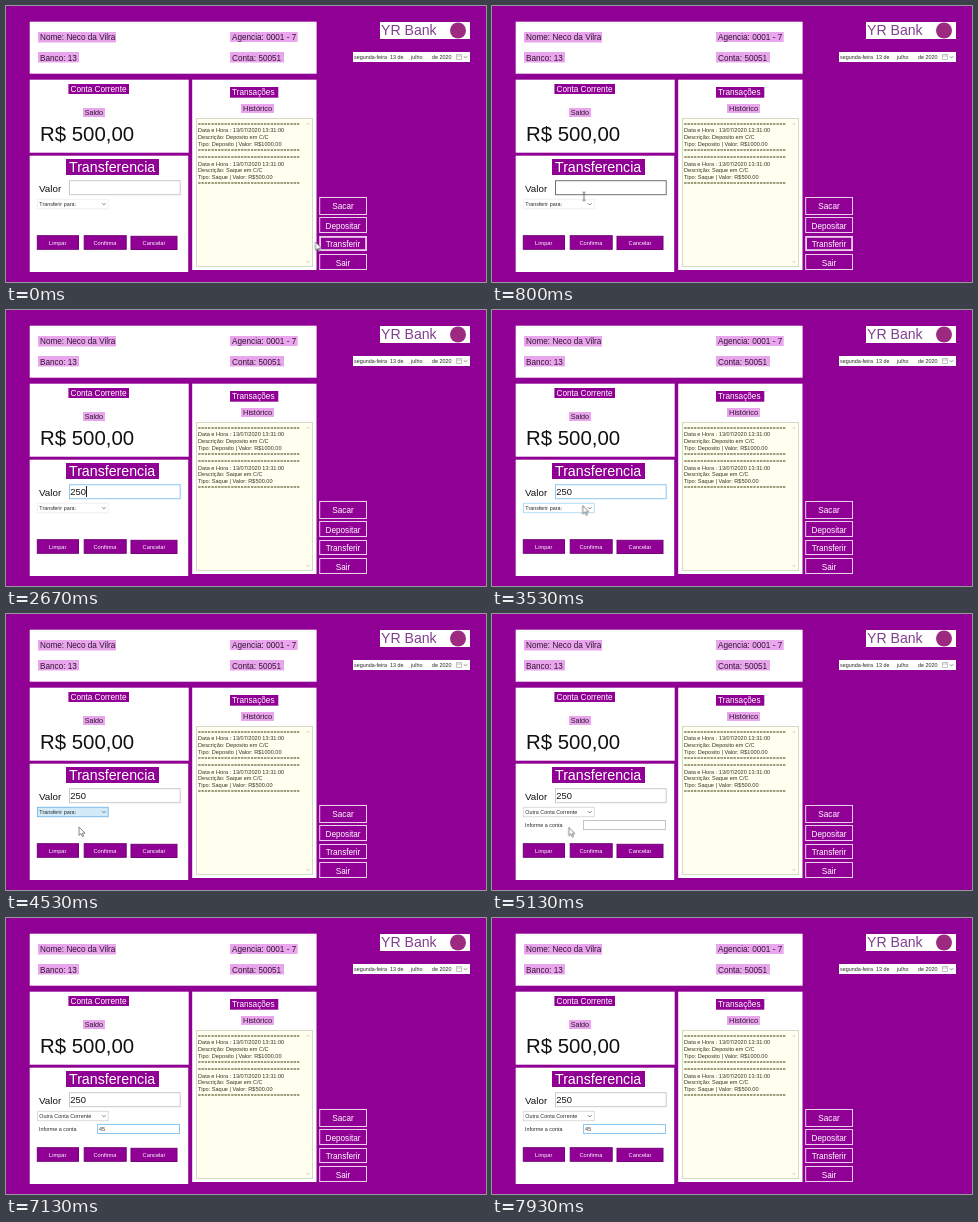
An HTML page for the animation above (8 s loop, 480 by 276 pixels).

```html
<!DOCTYPE html>
<html lang="pt">
<head>
<meta charset="utf-8">
<title>Transferencia</title>
<style>
html, body { margin: 0; width: 100%; height: 100%; overflow: hidden; background: #900094; }
svg { display: block; width: 480px; height: 276px; font-family: "Liberation Sans", Arial, sans-serif; }
.panel { fill: #fff; }
.plum { fill: #eaa6ec; }
.bg { fill: #900094; }
.label { font-size: 8.2px; fill: #301532; }
.light { fill: #fff; }
.small { font-size: 5.4px; fill: #2a2a2a; }
.history { font-size: 5.6px; fill: #33331f; }
.rule { font-size: 4.8px; letter-spacing: .49px; fill: #5c5c30; font-weight: bold; }
.side rect { fill: none; stroke: #edcfee; }
.side text { font-size: 8.2px; fill: #fff; text-anchor: middle; }
.btn rect { fill: #900094; stroke: #74007a; }
.btn text { font-size: 5.7px; fill: #fff; text-anchor: middle; }
.field { fill: #fff; stroke: #c4c4c4; }
.value { font-size: 9.4px; fill: #111; }
.chevron { fill: none; stroke: #666; stroke-width: .8; }

/* 1% = 80 ms */
.anim { animation: 8s step-end infinite; }
.focus { animation-name: focus; }
.amount { animation-name: amount; }
.caret1 { animation-name: caret1; }
.caret2 { animation-name: caret2; }
.d1 { animation-name: d1; }
.d2 { animation-name: d2; }
.d3 { animation-name: d3; }
.a1 { animation-name: a1; }
.a2 { animation-name: a2; }
.combo { animation-name: combo; }
.before { animation-name: before; }
.after { animation-name: after; }
.account { animation-name: account; }
.arrow { animation-name: arrow; }
.beam { animation-name: beam; }
.pointer { animation: move 8s ease-in-out infinite; }

@keyframes focus { 0% { opacity: 1 } 14%, 100% { opacity: 0 } }
@keyframes amount {
  0% { stroke: #cacaca } 8.4% { stroke: #707070 } 14% { stroke: #8cc8ef } 46.3%, 100% { stroke: #cacaca }
}
@keyframes caret1 {
  0% { opacity: 0; transform: none }
  14% { opacity: 1; transform: none }
  22.5% { opacity: 0; transform: none }
  29.1% { opacity: 1; transform: none }
  30% { opacity: 1; transform: translateX(6px) }
  31.6% { opacity: 1; transform: translateX(11px) }
  33.3% { opacity: 1; transform: translateX(16px) }
  34.1%, 100% { opacity: 0; transform: translateX(16px) }
}
@keyframes caret2 {
  0% { opacity: 0; transform: none }
  70.8% { opacity: 1; transform: none }
  76.6% { opacity: 1; transform: translateX(3px) }
  80% { opacity: 1; transform: translateX(6px) }
  85%, 100% { opacity: 0; transform: translateX(6px) }
}
@keyframes d1 { 0% { opacity: 0 } 30%, 100% { opacity: 1 } }
@keyframes d2 { 0% { opacity: 0 } 31.6%, 100% { opacity: 1 } }
@keyframes d3 { 0% { opacity: 0 } 33.3%, 100% { opacity: 1 } }
@keyframes a1 { 0% { opacity: 0 } 76.6%, 100% { opacity: 1 } }
@keyframes a2 { 0% { opacity: 0 } 80%, 100% { opacity: 1 } }
@keyframes combo {
  0% { stroke: #f0f0f0; fill: #fff }
  43% { stroke: #b5dcf5; fill: #fff }
  46.3% { stroke: #7fbbe6; fill: #d3eaf9 }
  61.6%, 100% { stroke: #dadada; fill: #fff }
}
@keyframes before { 0% { opacity: 1 } 61.6%, 100% { opacity: 0 } }
@keyframes after { 0% { opacity: 0 } 61.6%, 100% { opacity: 1 } }
@keyframes account { 0% { stroke: #c4c4c4 } 70.8%, 100% { stroke: #8cc8ef } }
@keyframes arrow {
  0% { opacity: 1 } 8.4% { opacity: 0 } 43% { opacity: 1 } 67%, 100% { opacity: 0 }
}
@keyframes beam {
  0% { opacity: 0 } 8.4% { opacity: 1 } 30% { opacity: 0 } 40.8% { opacity: 1 }
  43% { opacity: 0 } 67% { opacity: 1 } 76.6%, 100% { opacity: 0 }
}
@keyframes move {
  0%, .9% { transform: translate(309.5px, 236px) }
  9%, 40.8% { transform: translate(92px, 190.5px) }
  44%, 47% { transform: translate(90.7px, 195.5px) }
  56%, 62.5% { transform: translate(73px, 213px) }
  70.8%, 100% { transform: translate(120.5px, 218px) }
}
</style>
</head>
<body>
<svg viewBox="0 0 480 276">
  <rect class="bg" width="480" height="276"/>

  <g class="panel">
    <rect x="23.7" y="15.7" width="286.9" height="52"/>
    <rect x="23.7" y="73.7" width="159" height="73"/>
    <rect x="23.7" y="149.7" width="158.5" height="116.3"/>
    <rect x="186.2" y="73.7" width="124.3" height="190.3"/>
    <rect x="374" y="16" width="90" height="17"/>
    <rect x="347" y="46" width="117" height="10"/>
  </g>

  <g class="plum">
    <rect x="32" y="26" width="78" height="10.5"/>
    <rect x="32" y="46" width="41" height="10.5"/>
    <rect x="224" y="26" width="67.7" height="10"/>
    <rect x="224" y="46" width="54" height="10.5"/>
    <rect x="77" y="102" width="22" height="9"/>
    <rect x="235" y="98" width="33" height="9"/>
  </g>
  <g class="label">
    <text x="34" y="34">Nome: Neco da Vilra</text>
    <text x="34" y="54.5">Banco: 13</text>
    <text x="226" y="34">Agencia: 0001 - 7</text>
    <text x="226" y="54.5">Conta: 50051</text>
    <text x="78.7" y="109" font-size="7.2">Saldo</text>
    <text x="237" y="105" font-size="7.5">Histórico</text>
  </g>

  <text x="375" y="29" font-size="14.1" fill="#81408f">YR Bank</text>
  <circle cx="452" cy="24.5" r="8" fill="#9c2a80"/>

  <g class="small">
    <text x="348" y="53">segunda-feira</text>
    <text x="384" y="53">13 de</text>
    <text x="405" y="53">julho</text>
    <text x="426" y="53">de 2020</text>
  </g>
  <path d="M450.5 48.5h5v5h-5zM450.5 50h5" fill="none" stroke="#aaa" stroke-width=".7"/>
  <path class="chevron" d="M458 50.3l1.6 1.6 1.6-1.6"/>

  <g class="bg">
    <rect x="62.4" y="78" width="60.6" height="10"/>
    <rect x="60" y="153" width="93" height="16"/>
    <rect x="224" y="81" width="48.3" height="10.7"/>
  </g>
  <g class="label">
    <text class="light" x="64.5" y="86">Conta Corrente</text>
    <text class="light" x="226" y="89.3">Transações</text>
  </g>
  <text class="light" x="63" y="166" font-size="14.2">Transferencia</text>
  <text x="34" y="135" font-size="20.4" fill="#111">R$ 500,00</text>

  <rect x="190.5" y="112.5" width="116" height="148" fill="#fffff0" stroke="#d8d8c8"/>
  <path d="M300.5 118.5l1.5-1.5 1.5 1.5M300.5 255l1.5 1.5 1.5-1.5" fill="none" stroke="#bbb" stroke-width=".7"/>
  <g class="history" id="history"></g>

  <g class="side">
    <rect x="313.7" y="191.5" width="46.8" height="17"/>
    <rect x="313.7" y="211.5" width="46.8" height="15"/>
    <rect x="313.7" y="230.5" width="46.8" height="14"/>
    <rect x="313.7" y="248.5" width="46.8" height="15"/>
    <rect class="anim focus" x="314.5" y="231.3" width="45.2" height="12.4"/>
    <text x="337" y="203">Sacar</text>
    <text x="337" y="222.5">Depositar</text>
    <text x="337" y="241">Transferir</text>
    <text x="337" y="259.5">Sair</text>
  </g>

  <text x="33" y="186" font-size="9.8" fill="#111">Valor</text>
  <rect class="field anim amount" x="63.5" y="174.7" width="110.7" height="14"/>
  <g class="value">
    <text class="anim d1" x="64.3" y="185.2">2</text>
    <text class="anim d2" x="69.5" y="185.2">5</text>
    <text class="anim d3" x="74.7" y="185.2">0</text>
  </g>
  <rect class="anim caret1" x="64" y="176" width="1" height="11" fill="#222"/>

  <rect class="anim combo" x="31.5" y="193.3" width="70.7" height="9.4"/>
  <path class="chevron" d="M96 197.2l1.8 1.8 1.8-1.8"/>
  <text class="small anim before" x="33.3" y="200">Transferir para:</text>
  <g class="anim after">
    <text class="small" x="33.3" y="200">Outra Conta Corrente</text>
    <text class="small" x="33" y="213">Informe a conta</text>
    <rect class="field anim account" x="91.5" y="206.5" width="82" height="9"/>
  </g>
  <g class="small">
    <text class="anim a1" x="93" y="213">4</text>
    <text class="anim a2" x="96" y="213">5</text>
  </g>
  <rect class="anim caret2" x="93" y="208" width="1" height="6" fill="#222"/>

  <g class="btn">
    <rect x="31.3" y="229.7" width="41.2" height="13.6"/>
    <rect x="78.2" y="229.7" width="42" height="13.6"/>
    <rect x="125" y="230.3" width="46" height="13.2"/>
    <text x="51.7" y="238.5">Limpar</text>
    <text x="99" y="238.5">Confirma</text>
    <text x="148" y="239.3">Cancelar</text>
  </g>

  <g class="pointer">
    <path class="anim arrow" d="M0 0v8.4l2-1.8 1.4 3.1 1.3-.6-1.4-2.9h2.7z" fill="#fff" stroke="#555" stroke-width=".7"/>
    <path class="anim beam" d="M-1.6-4h3.2M0-4v8M-1.6 4h3.2" fill="none" stroke="#555" stroke-width=".8"/>
  </g>
</svg>
<script>
const rule = "=".repeat(31);
const entry = (what, value) => [
  rule,
  "Data e Hora : 13/07/2020 13:31:00",
  `Descrição: ${what} em C/C`,
  `Tipo: ${what} | Valor: R$${value}`,
  rule
];
const box = document.getElementById("history");
[...entry("Deposito", "1000.00"), ...entry("Saque", "500.00")].forEach((line, i) => {
  const text = document.createElementNS(box.namespaceURI, "text");
  text.setAttribute("x", 192);
  text.setAttribute("y", 119.8 + i * 6.63);
  if (line === rule) text.setAttribute("class", "rule");
  text.textContent = line;
  box.append(text);
});
</script>
</body>
</html>
```
